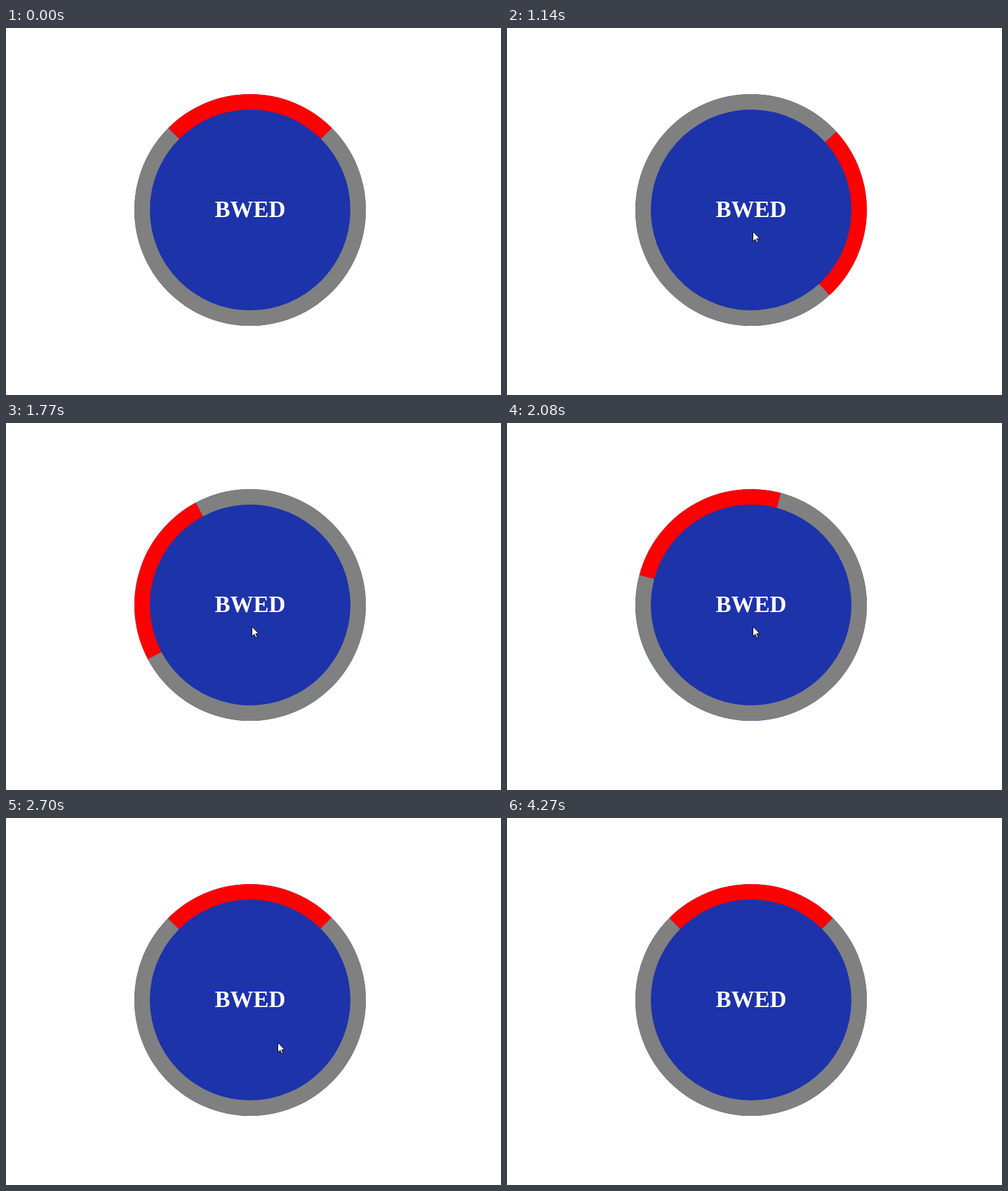
Animation, 802 px wide and 594 px high, one loop 6.23 s. Source, as an HTML page:

```html
<!DOCTYPE html>
<html lang="en">
<head>
<meta charset="utf-8">
<title>Spinning ring</title>
<style>
  html, body { margin: 0; width: 100%; height: 100%; overflow: hidden; background: #fff; }
  #disc {
    position: absolute; left: 208px; top: 107px; width: 375px; height: 375px;
    border-radius: 50%; background: #1d33aa;
  }
  #ring {
    height: 100%; box-sizing: border-box; border-radius: 50%;
    border: 25px solid gray; border-top-color: red;
  }
  svg { position: absolute; left: 0; top: 0; }
  text { font: bold 37.5px "Liberation Serif", "Times New Roman", serif; fill: #fff; text-anchor: middle; }
</style>
</head>
<body>
<div id="disc"><div id="ring"></div></div>
<svg width="802" height="594">
  <text x="395.5" y="306">BWED</text>
  <path id="cursor" d="M.5 .5V16.5L4.2 13 6.8 18.5 9 17.5 6.6 12H11.5Z" fill="#fff" stroke="#000"/>
</svg>
<script>
const LOOP = 6230, STEP = 78, SHOW = 520, HIDE = 4270;
const SPIN_START = 778, SPIN_TIME = 2000;

const ring = document.getElementById('ring');
const cursor = document.getElementById('cursor');

const linear = u => u;
const easeOut = u => 1 - (1 - u) ** 1.5;
const easeInOut = u => u < 0.5 ? 4 * u ** 3 : 1 - 4 * (1 - u) ** 3;
const progress = (t, from, to) => Math.min(1, Math.max(0, (t - from) / (to - from)));

// Pointer moves in, rests, moves out, then drifts off the stage
const entry = { x: 633, y: 553 };
const moves = [
  { from: SHOW, to: 1140, dx: -235, dy: -224, ease: easeOut },
  { from: 2510, to: 3094, dx: 284, dy: 233, ease: easeInOut },
  { from: 3094, to: 3328, dx: 11, dy: 14, ease: linear },
  { from: 4108, to: 4186, dx: 11, dy: 10, ease: linear }
];

function pointerAt(t) {
  let { x, y } = entry;
  for (const m of moves) {
    const k = m.ease(progress(t, m.from, m.to));
    x += m.dx * k;
    y += m.dy * k;
  }
  return [Math.round(x), Math.round(y)];
}

// CSS "ease": cubic-bezier(.25, .1, .25, 1), solved by bisection
const bezier = (a, b, u) => 3 * a * u * (1 - u) ** 2 + 3 * b * u * u * (1 - u) + u ** 3;

function cssEase(x) {
  let lo = 0, hi = 1;
  for (let i = 0; i < 30; i++) {
    const mid = (lo + hi) / 2;
    if (bezier(0.25, 0.25, mid) < x) lo = mid; else hi = mid;
  }
  return bezier(0.1, 1, lo);
}

function draw(t) {
  // The picture advances in even steps
  const s = SHOW + Math.floor((t - SHOW + 8) / STEP) * STEP;
  const spin = cssEase(progress(s, SPIN_START, SPIN_START + SPIN_TIME));
  ring.style.transform = `rotate(${360 * spin}deg)`;
  cursor.style.display = t >= SHOW && t < HIDE ? '' : 'none';
  cursor.setAttribute('transform', `translate(${pointerAt(s)})`);
}

const start = performance.now();
function tick() {
  draw((performance.now() - start) % LOOP);
  requestAnimationFrame(tick);
}
tick();
</script>
</body>
</html>
```
